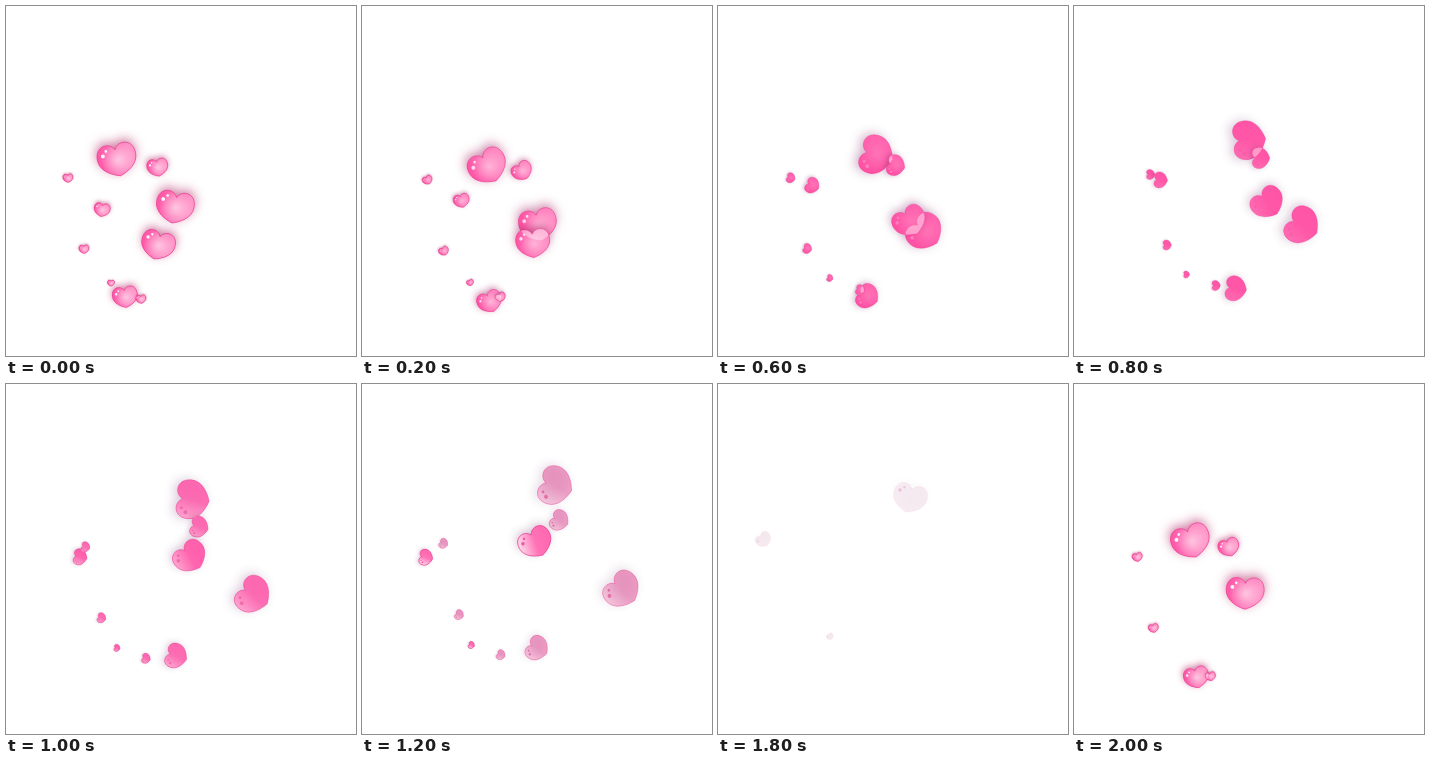
Write an HTML page with a canvas that moves like this. It is 350 by 350 pixels and loops after 2200 ms.

```html
<!DOCTYPE html>
<html>
<head>
<meta charset="utf-8">
<title>Floating hearts</title>
<style>
html, body { margin: 0; width: 100%; height: 100%; overflow: hidden; background: #fff; }
canvas { display: block; width: 350px; height: 350px; }
</style>
</head>
<body>
<canvas id="stage" width="350" height="350"></canvas>
<script>
const ctx = document.getElementById('stage').getContext('2d');
const STEP = 200, STEPS = 11;

// Plump unit heart, tip pointing down
const shape = new Path2D('M0-.24C.1-.47 .5-.45 .5-.06C.5.24 .17.39 0 .44C-.17.39-.5.24-.5-.06C-.5-.45-.1-.47 0-.24Z');

// Each wave: key steps, opacity per step, hearts with their path and tip angles
const early = {
  keys: [0, 2, 4, 5, 7],
  turn: [85, 40, 0, 15, 30],
  alpha: [1, 1, 1, 1, 1, .92, .6, .28, 0, 0, 1],
  last: .4,
  hearts: [
    { size: 39, x: [111, 141, 174.5, 186, 198.5], y: [153, 159, 134, 115.5, 90], turn: [78, 40, -5, 5, 30] },
    { size: 21, x: [151.5, 168.5, 186.5, 193, 200.5], y: [161, 164.5, 152, 143, 131], turn: [80, 35, 0, 15, 35] },
    { size: 38, x: [169, 188, 228, 247, 270.5], y: [200.5, 227, 219.5, 211, 201.5], turn: [100, 60, 28, 32, 52] },
    { size: 25, x: [119, 137.5, 161.5, 170, 178.5], y: [290.5, 295.5, 282.5, 272, 258], turn: [82, 50, 8, 18, 38] },
    { size: 10, x: [135, 141, 142, 140, 138], y: [293, 288, 279.5, 274.5, 268] },
    { size: 10, x: [62, 69, 76.5, 79.5, 83], y: [172, 174, 168.5, 163, 157] },
    { size: 10, x: [78, 85.5, 93, 95.5, 98.5], y: [243, 245, 239, 234, 228.5] }
  ]
};
const late = {
  keys: [0, 2, 4, 5, 7, 9],
  turn: [90, 40, 0, 10, 30, 60],
  alpha: [1, 1, 1, 1, 1, 1, 1, .88, .4, .1, 0],
  last: 10,
  hearts: [
    { size: 34, x: [152, 184, 193.5, 184, 168, 192], y: [238.5, 229, 196.5, 172.5, 145, 113.5], turn: [105, 70, 50, 48, 75, 105] },
    { size: 16, x: [96, 99, 86.5, 74, 55, 45.5], y: [203.5, 186.5, 174, 173, 172, 155.5], turn: [100, 50, 5, 10, 15, 50] },
    { size: 7, x: [105, 110.5, 112.5, 111, 108.5, 112], y: [277, 275, 268.5, 264, 258.5, 252.5] }
  ]
};

const clamp = v => Math.max(0, Math.min(1, v));
const mix = (a, b, t) => a + (b - a) * t;
const white = a => `rgba(255,255,255,${a})`;

// Smooth curve through the key values, parabolic at both ends
function curve(keys, vals, u) {
  const end = keys.length - 1;
  let i = 0;
  while (i < end - 1 && u > keys[i + 1]) i++;
  const rate = (a, b) => (vals[b] - vals[a]) / (keys[b] - keys[a]);
  const slope = k => {
    if (k === 0) return 2 * rate(0, 1) - rate(0, 2);
    if (k === end) return 2 * rate(end - 1, end) - rate(end - 2, end);
    return rate(k - 1, k + 1);
  };
  const d = keys[i + 1] - keys[i], t = (u - keys[i]) / d, t2 = t * t, t3 = t2 * t;
  return vals[i] * (2 * t3 - 3 * t2 + 1) + vals[i + 1] * (3 * t2 - 2 * t3)
    + d * (slope(i) * (t3 - 2 * t2 + t) + slope(i + 1) * (t3 - t2));
}

function place(h) {
  ctx.setTransform(1, 0, 0, 1, h.x, h.y);
  ctx.rotate((h.turn - 90) * Math.PI / 180);
  ctx.scale(h.size, h.size);
}

function dot(x, y, r) {
  ctx.beginPath();
  ctx.arc(x, y, r, 0, 7);
  ctx.fill();
}

function drawHeart(h) {
  const gloss = clamp(1.1 - h.u * .28), rear = clamp((h.u - 3.5) / 2.5);
  const faded = clamp(1.3 - h.alpha * 1.4), tip = h.turn * Math.PI / 180;
  ctx.save();
  place(h);
  ctx.globalAlpha = h.alpha;

  // Soft shadow behind the lobes
  ctx.shadowColor = `rgba(${90 + 90 * gloss},${40 * gloss},${80 + 20 * gloss},${.24 + .4 * gloss})`;
  ctx.shadowBlur = h.size * .28;
  ctx.shadowOffsetX = -Math.cos(tip) * h.size * .09;
  ctx.shadowOffsetY = -Math.sin(tip) * h.size * .09;
  ctx.fillStyle = `rgb(${mix(255, 185, faded)},80,${mix(164, 136, faded)})`;
  ctx.fill(shape);
  ctx.shadowColor = 'transparent';

  if (gloss > 0) {
    const side = ctx.createLinearGradient(-.4, 0, .4, 0);
    side.addColorStop(0, white(.05 * gloss));
    side.addColorStop(1, white(.4 * gloss));
    ctx.fillStyle = side;
    ctx.fill(shape);
    const glow = ctx.createRadialGradient(.02, .03, 0, .02, .03, .45);
    glow.addColorStop(0, white(.58 * gloss));
    glow.addColorStop(1, white(0));
    ctx.fillStyle = glow;
    ctx.fill(shape);
  }
  if (rear > 0) {
    const side = ctx.createLinearGradient(-.45, -.12, .3, .05);
    side.addColorStop(0, white(.75 * rear));
    side.addColorStop(.6, white(.2 * rear));
    side.addColorStop(1, white(.15 * rear));
    ctx.fillStyle = side;
    ctx.fill(shape);
  }

  ctx.lineWidth = .8 / h.size;
  ctx.strokeStyle = `rgba(232,50,138,${.25 + .5 * Math.max(gloss, rear)})`;
  ctx.stroke(shape);

  ctx.globalAlpha = Math.sqrt(h.alpha);
  ctx.fillStyle = gloss > 0 ? white(.95 * gloss) : `rgba(222,50,130,${.7 * rear})`;
  dot(-.34, -.14, .05);
  dot(-.24, -.25, .035);
  ctx.restore();
}

// Hearts turn pale where they cross
function drawCrossing(a, b) {
  if (Math.hypot(a.x - b.x, a.y - b.y) > (a.size + b.size) / 2) return;
  ctx.save();
  place(a);
  ctx.clip(shape);
  place(b);
  ctx.fillStyle = white(.4 * Math.min(a.alpha, b.alpha));
  ctx.fill(shape);
  ctx.restore();
}

function pose(wave, step) {
  const alpha = wave.alpha[step];
  if (!alpha) return [];
  const u = step === STEPS - 1 ? wave.last : step;
  const at = vals => curve(wave.keys, vals, u);
  return wave.hearts.map(h => ({
    u, alpha, size: h.size, x: at(h.x), y: at(h.y), turn: at(h.turn || wave.turn)
  }));
}

function draw(now) {
  const step = Math.floor(now / STEP) % STEPS;
  ctx.setTransform(1, 0, 0, 1, 0, 0);
  ctx.fillStyle = '#fff';
  ctx.fillRect(0, 0, 350, 350);
  const hearts = [...pose(early, step), ...pose(late, step)];
  hearts.forEach(drawHeart);
  hearts.forEach((a, i) => hearts.slice(i + 1).forEach(b => drawCrossing(a, b)));
}

const start = performance.now();
function tick() {
  draw(performance.now() - start);
  requestAnimationFrame(tick);
}
tick();
</script>
</body>
</html>
```
